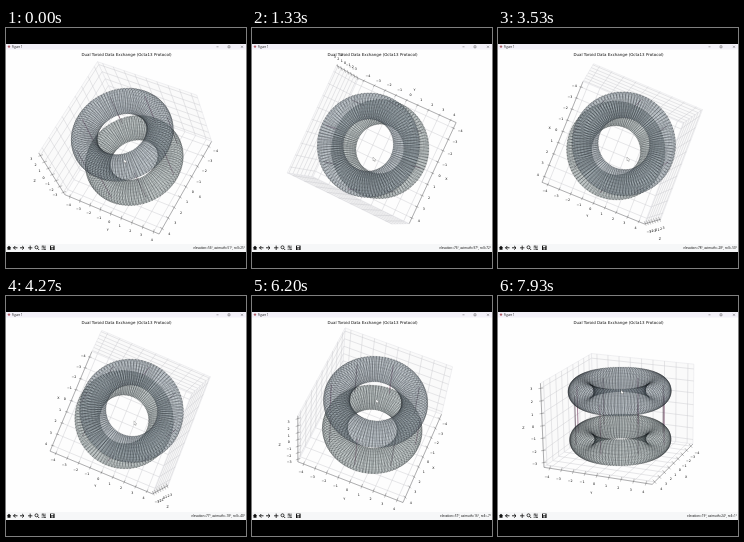
An HTML page with a canvas for the animation above (8 s loop, 240x240 px).

```html
<!DOCTYPE html>
<html lang="en">
<head>
<meta charset="utf-8">
<title>Dual toroid plot</title>
<style>
  html, body { margin: 0; width: 100%; height: 100%; overflow: hidden; background: #000; }
  canvas { display: block; width: 100vw; height: 100vh; }
</style>
</head>
<body>
<canvas id="stage"></canvas>
<script>
const LOOP = 8000, STEPS = 120, STEP = LOOP / STEPS, RAD = Math.PI / 180;
const CENTER = [122, 119], UNIT = 12.75, DISTANCE = 75;
const LIMIT = [4.5, 4.5, 3.4], TICK = [4, 4, 3];
const MAJOR = 3, MINOR = 1, AROUND = 100, TUBE = 24;

// time, tilt of the z axis (up, left) in degrees, twist, pointer x, pointer y
const POSES = [
  [0, 30.8, 14.4, 26, 118, 131],
  [1330, 4.3, 13.3, 25, 121, 129],
  [2200, 3.2, 7.9, 24, 127, 132],
  [3530, 7.5, -8.9, 22, 129, 129],
  [5070, 13.7, -7.3, 23, 126, 118],
  [6200, 32.7, -4, 23, 124, 103],
  [7930, 71, 1, 23, 123, 94]
];

const canvas = document.getElementById('stage');
const ctx = canvas.getContext('2d');

function slope(i, col) {
  if (i <= 0 || i >= POSES.length - 1) return 0;
  const rate = j => (POSES[j + 1][col] - POSES[j][col]) / (POSES[j + 1][0] - POSES[j][0]);
  const a = rate(i - 1), b = rate(i);
  return a * b <= 0 ? 0 : 2 * a * b / (a + b);
}

function poseAt(time) {
  let i = 0;
  while (i < POSES.length - 2 && time > POSES[i + 1][0]) i++;
  const span = POSES[i + 1][0] - POSES[i][0];
  const s = Math.min(1, (time - POSES[i][0]) / span), s2 = s * s, s3 = s2 * s;
  const value = col =>
    (2 * s3 - 3 * s2 + 1) * POSES[i][col] + (3 * s2 - 2 * s3) * POSES[i + 1][col] +
    span * ((s3 - 2 * s2 + s) * slope(i, col) + (s3 - s2) * slope(i + 1, col));
  const up = value(1), left = value(2), roll = Math.atan2(left, up) / RAD;
  return { elev: 90 - Math.hypot(up, left), azim: roll + value(3), roll, pointer: [value(4), value(5)] };
}

function makeProjector({ elev, azim, roll }) {
  const se = Math.sin(elev * RAD), ce = Math.cos(elev * RAD);
  const sa = Math.sin(azim * RAD), ca = Math.cos(azim * RAD);
  const sr = Math.sin(roll * RAD), cr = Math.cos(roll * RAD);
  return ([x, y, z]) => {
    const toward = x * ca + y * sa;
    const right = y * ca - x * sa, up = z * ce - toward * se;
    const depth = toward * ce + z * se, k = UNIT * DISTANCE / (DISTANCE - depth);
    return [CENTER[0] + k * (right * cr - up * sr), CENTER[1] - k * (right * sr + up * cr), depth];
  };
}

function trace(points, close) {
  ctx.beginPath();
  points.forEach(p => ctx.lineTo(p[0], p[1]));
  if (close) ctx.closePath();
}

function line(points, color, width) {
  trace(points);
  ctx.strokeStyle = color;
  ctx.lineWidth = width;
  ctx.stroke();
}

function label(text, x, y, size, align = 'center', font = '"DejaVu Sans", sans-serif', color = '#111') {
  ctx.font = `${size}px ${font}`;
  ctx.textAlign = align;
  ctx.textBaseline = 'middle';
  ctx.fillStyle = color;
  ctx.fillText(text, x, y);
}

function place(axis, value, others) {
  const p = others.slice();
  p[axis] = value;
  return p;
}

function drawWalls(project, far) {
  for (let axis = 0; axis < 3; axis++) {
    const [b, c] = [0, 1, 2].filter(k => k !== axis);
    const at = (vb, vc) => {
      const p = [0, 0, 0];
      p[axis] = far[axis] * LIMIT[axis];
      p[b] = vb;
      p[c] = vc;
      return project(p);
    };
    const B = LIMIT[b], C = LIMIT[c];
    trace([at(-B, -C), at(B, -C), at(B, C), at(-B, C)], true);
    ctx.fillStyle = axis === 2 ? '#fdfdfd' : '#fafafa';
    ctx.fill();
    ctx.strokeStyle = '#dcdce0';
    ctx.lineWidth = 0.4;
    ctx.stroke();
    for (let v = -TICK[b]; v <= TICK[b]; v++) line([at(v, -C), at(v, C)], '#cacace', 0.45);
    for (let v = -TICK[c]; v <= TICK[c]; v++) line([at(-B, v), at(B, v)], '#cacace', 0.45);
  }
}

function drawAxes(project, far) {
  const sides = [
    [0, -far[1], -1],
    [-far[0], 0, -1],
    [-far[0], far[1], 0]
  ];
  sides.forEach((side, axis) => {
    const shifted = pad => side.map((s, k) => s * (LIMIT[k] + pad));
    const edge = shifted(0), inner = shifted(-0.15), outer = shifted(0.12);
    line([project(place(axis, -LIMIT[axis], edge)), project(place(axis, LIMIT[axis], edge))], '#333', 0.35);
    for (let v = -TICK[axis]; v <= TICK[axis]; v++) {
      line([project(place(axis, v, inner)), project(place(axis, v, outer))], '#333', 0.3);
      const [x, y] = project(place(axis, v, shifted(0.52)));
      label(String(v).replace('-', '\u2212'), x, y, 3.3);
    }
    const [x, y] = project(place(axis, 0, shifted(1.05)));
    label('XYZ'[axis], x, y, 3.3);
  });
}

function ringPoint(i, j, height) {
  const u = i / AROUND * 2 * Math.PI, v = j / TUBE * 2 * Math.PI;
  const r = MAJOR + MINOR * Math.cos(v);
  return [r * Math.cos(u), r * Math.sin(u), height + MINOR * Math.sin(v)];
}

function drawTorus(project, height, fill) {
  const grid = [];
  for (let i = 0; i <= AROUND; i++) {
    grid.push(Array.from({ length: TUBE + 1 }, (_, j) => project(ringPoint(i, j, height))));
  }
  const cells = [];
  for (let i = 0; i < AROUND; i++) {
    for (let j = 0; j < TUBE; j++) {
      const corners = [grid[i][j], grid[i + 1][j], grid[i + 1][j + 1], grid[i][j + 1]];
      cells.push({ corners, depth: corners.reduce((sum, p) => sum + p[2], 0) });
    }
  }
  cells.sort((a, b) => a.depth - b.depth);
  for (const { corners } of cells) {
    trace(corners, true);
    ctx.fillStyle = fill;
    ctx.fill();
    line([corners[0], corners[1]], 'rgba(16, 20, 24, 0.3)', 0.24);
    line([corners[0], corners[3]], 'rgba(8, 12, 16, 0.66)', 0.42);
  }
}

function drawLinks(project) {
  for (let k = 0; k < 8; k++) {
    const angle = k * Math.PI / 4, x = 3.7 * Math.cos(angle), y = 3.7 * Math.sin(angle);
    line([project([x, y, -2]), project([x, y, 2])], k % 2 ? '#2e1228' : '#581c44', 0.55);
  }
}

function drawWindow() {
  ctx.fillStyle = '#000';
  ctx.fillRect(0, 0, 240, 240);
  ctx.fillStyle = '#fefefe';
  ctx.fillRect(0, 16, 240, 208);
  ctx.fillStyle = '#f3f1f9';
  ctx.fillRect(0, 16, 240, 5.5);
  ctx.fillStyle = '#f6f7f8';
  ctx.fillRect(0, 216, 240, 8);
  ctx.fillStyle = '#b0606a';
  ctx.beginPath();
  ctx.arc(3, 18.6, 1.2, 0, 7);
  ctx.fill();
  label('Figure 1', 6, 18.8, 2.8, 'left', '"Open Sans", sans-serif');
  line([[210.5, 18.8], [212.5, 18.8]], '#333', 0.4);
  ctx.strokeRect(222, 17.8, 2, 2);
  line([[235, 17.8], [237, 19.8]], '#333', 0.4);
  line([[237, 17.8], [235, 19.8]], '#333', 0.4);
}

function drawToolbar({ elev, azim, roll }) {
  const ink = '#111';
  const y = 219.8;
  ctx.fillStyle = ink;
  trace([[0.8, y], [3, y - 2], [5.2, y], [4.5, y], [4.5, y + 2], [1.5, y + 2], [1.5, y]], true);
  ctx.fill();
  [[7.5, 1], [18, -1]].forEach(([x, dir]) => {
    line([[x, y], [x + dir * 4, y]], ink, 0.9);
    line([[x + dir * 1.8, y - 1.8], [x, y], [x + dir * 1.8, y + 1.8]], ink, 0.9);
  });
  line([[22, y], [26.4, y]], ink, 0.8);
  line([[24.2, y - 2.2], [24.2, y + 2.2]], ink, 0.8);
  ctx.beginPath();
  ctx.arc(30.5, y - 0.5, 1.5, 0, 7);
  ctx.stroke();
  line([[31.6, y + 0.6], [33.2, y + 2.2]], ink, 0.9);
  for (let k = -1; k <= 1; k++) {
    line([[35.5, y + k * 1.6], [40, y + k * 1.6]], ink, 0.5);
    ctx.fillRect(37.5 + k, y + k * 1.6 - 0.6, 0.9, 1.2);
  }
  ctx.fillRect(44, y - 2.2, 4.6, 4.4);
  ctx.fillStyle = '#f6f7f8';
  ctx.fillRect(45, y - 1.8, 2.4, 1.4);
  ctx.fillRect(45.3, y + 0.5, 2, 1.2);
  const angle = v => `${Math.round(v) || 0}\u00b0`;
  label(`elevation=${angle(elev)}, azimuth=${angle(azim)}, roll=${angle(roll)}`,
    239, y, 3.05, 'right', '"Open Sans", sans-serif', '#000');
}

function drawPointer([x, y]) {
  trace([[0, 0], [0, 4], [0.9, 3.2], [1.6, 4.6], [2.2, 4.3], [1.6, 3], [2.8, 2.9]]
    .map(([dx, dy]) => [x + dx, y + dy]), true);
  ctx.fillStyle = '#fff';
  ctx.fill();
  ctx.strokeStyle = '#444';
  ctx.lineWidth = 0.25;
  ctx.stroke();
}

function draw(step) {
  const ratio = window.devicePixelRatio || 1;
  const width = Math.round(innerWidth * ratio), height = Math.round(innerHeight * ratio);
  if (canvas.width !== width || canvas.height !== height) {
    canvas.width = width;
    canvas.height = height;
  }
  ctx.setTransform(width / 240, 0, 0, height / 240, 0, 0);
  ctx.lineJoin = 'round';
  const pose = poseAt(step * STEP);
  const project = makeProjector(pose);
  const far = [Math.cos(pose.azim * RAD) > 0 ? -1 : 1, Math.sin(pose.azim * RAD) > 0 ? -1 : 1, -1];
  drawWindow();
  drawWalls(project, far);
  drawAxes(project, far);
  drawLinks(project);
  drawTorus(project, -2, 'rgba(142, 156, 154, 0.3)');
  drawTorus(project, 2, 'rgba(136, 148, 160, 0.3)');
  label('Dual Toroid Data Exchange (Octa13 Protocol)', 120.5, 27.4, 4);
  drawToolbar(pose);
  drawPointer(pose.pointer);
}

let shown = -1;
function tick() {
  const step = Math.floor((performance.now() + 4) / STEP) % STEPS;
  if (step !== shown) draw(shown = step);
  requestAnimationFrame(tick);
}
tick();
</script>
</body>
</html>
```
